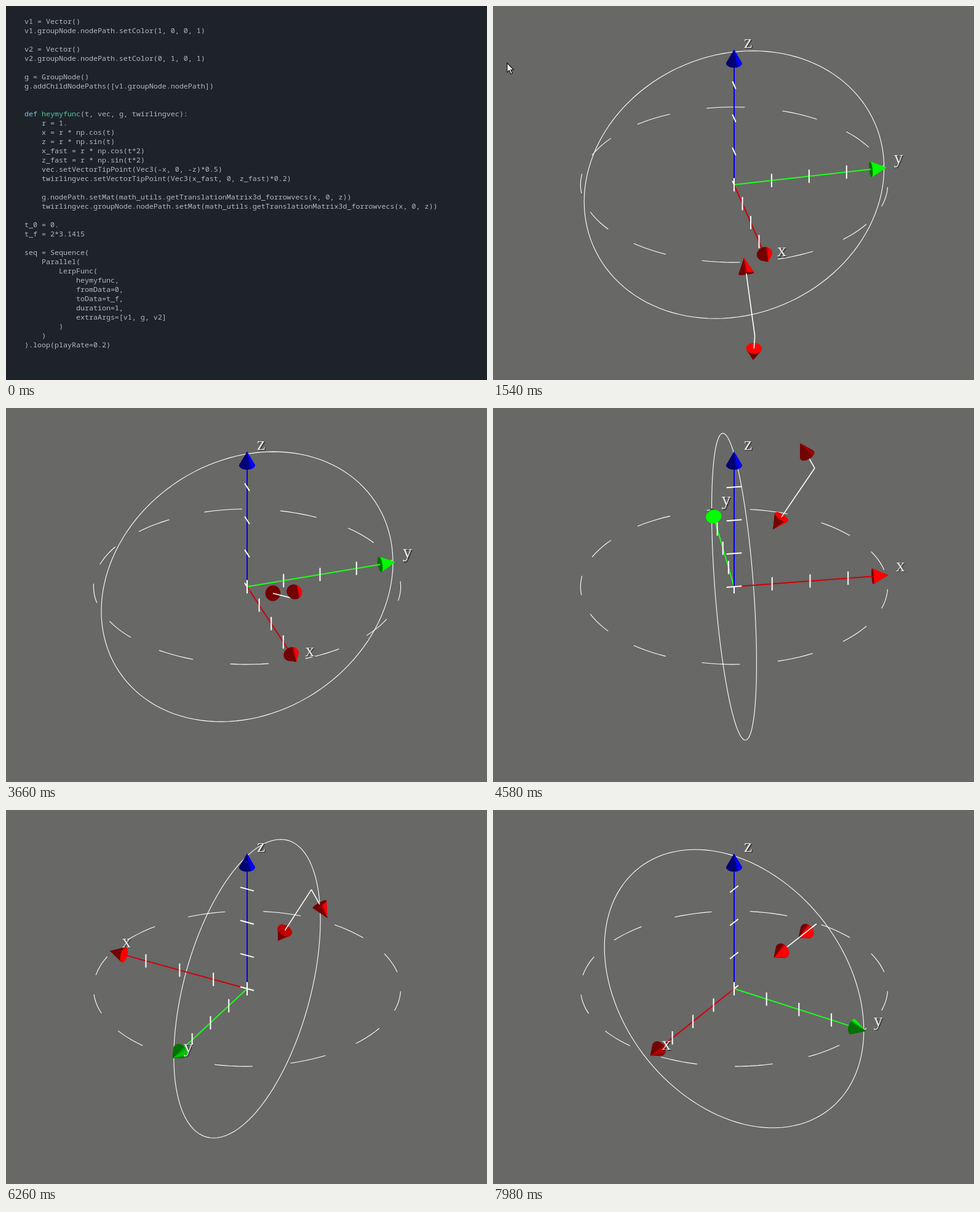
An HTML page with a canvas for the animation above (8 s loop, 782 by 607 pixels).

```html
<!DOCTYPE html>
<html>
<head>
<meta charset="utf-8">
<style>
html, body { margin: 0; width: 782px; height: 607px; overflow: hidden; background: #686866; }
canvas, pre { position: absolute; left: 0; top: 0; }
pre {
  box-sizing: border-box; width: 782px; height: 607px; margin: 0; padding: 17px 30px;
  background: #1d2329; color: #b1bac1;
  font: 11.6667px/15px "Noto Sans Mono", "DejaVu Sans Mono", monospace;
}
b { font-weight: normal; color: #7cc4e0; }
i { font-style: normal; color: #4fc9a0; }
</style>
</head>
<body>
<canvas id="stage" width="782" height="607"></canvas>
<pre id="code">v1 = Vector()
v1.groupNode.nodePath.setColor(1, 0, 0, 1)

v2 = Vector()
v2.groupNode.nodePath.setColor(0, 1, 0, 1)

g = GroupNode()
g.addChildNodePaths([v1.groupNode.nodePath])


<b>def</b> <i>heymyfunc</i>(t, vec, g, twirlingvec):
    r = 1.
    x = r * np.cos(t)
    z = r * np.sin(t)
    x_fast = r * np.cos(t*2)
    z_fast = r * np.sin(t*2)
    vec.setVectorTipPoint(Vec3(-x, 0, -z)*0.5)
    twirlingvec.setVectorTipPoint(Vec3(x_fast, 0, z_fast)*0.2)

    g.nodePath.setMat(math_utils.getTranslationMatrix3d_forrowvecs(x, 0, z))
    twirlingvec.groupNode.nodePath.setMat(math_utils.getTranslationMatrix3d_forrowvecs(x, 0, z))

t_0 = 0.
t_f = 2*3.1415

seq = Sequence(
    Parallel(
        LerpFunc(
            heymyfunc,
            fromData=0,
            toData=t_f,
            duration=1,
            extraArgs=[v1, g, v2]
        )
    )
).loop(playRate=0.2)</pre>
<script>
const ctx = document.getElementById('stage').getContext('2d');
const code = document.getElementById('code');
const R = 249.7, CX = 392, CY = 290, TAU = 2 * Math.PI, DEG = Math.PI / 180;
const TILT_SIN = .505, TILT_COS = .863;
const LAMP = [1.8, .2, .1]; // point light, in view space
const RED = [255, 0, 0], GREEN = [0, 255, 0], BLUE = [0, 0, 255];

// Camera turn around the z axis: [ms, degrees]
const TURN = [[3000, 12.5], [3400, 13.2], [3660, 18.3], [3820, 30], [4200, 66], [4500, 96],
  [4580, 98.4], [4720, 99.5], [5540, 149.7], [6260, 241.5], [6340, 248], [6980, 286],
  [7140, 288], [7900, 327.6]];

function track(keys, t) {
  if (t <= keys[0][0]) return keys[0][1];
  for (let k = 1; k < keys.length; k++) {
    const [t0, v0] = keys[k - 1], [t1, v1] = keys[k];
    if (t < t1) return v0 + (v1 - v0) * (t - t0) / (t1 - t0);
  }
  return keys[keys.length - 1][1];
}

const add = (a, b, k = 1) => a.map((v, j) => v + b[j] * k);
const dot = (a, b) => a[0] * b[0] + a[1] * b[1] + a[2] * b[2];
const cross = (a, b) => [a[1] * b[2] - a[2] * b[1], a[2] * b[0] - a[0] * b[2], a[0] * b[1] - a[1] * b[0]];
const unit = a => a.map(v => v / Math.hypot(...a));
const screen = p => [CX + R * p[0], CY - R * p[1]];

let phi;
// World to view space: right, up, towards the viewer
function view(x, y, z) {
  const s = Math.sin(phi), c = Math.cos(phi), near = x * c - y * s;
  return [x * s + y * c, TILT_COS * z - TILT_SIN * near, TILT_SIN * z + TILT_COS * near];
}

function path(points) {
  ctx.beginPath();
  points.forEach(p => ctx.lineTo(...screen(p)));
}

function line(points, color, width) {
  path(points);
  ctx.strokeStyle = color;
  ctx.lineWidth = width;
  ctx.stroke();
}

function face(points, normal, rgb) {
  const toLamp = unit(add(LAMP, points[0], -1));
  const k = Math.min(1, .45 + 1.4 * Math.max(0, dot(normal, toLamp)));
  path(points);
  ctx.closePath();
  ctx.fillStyle = ctx.strokeStyle = `rgb(${rgb.map(v => Math.round(v * k))})`;
  ctx.lineWidth = .6;
  ctx.fill();
  ctx.stroke();
}

function cone(base, tip, dir, rgb) {
  const a = unit(cross(dir, Math.abs(dir[2]) < .9 ? [0, 0, 1] : [0, 1, 0])), b = cross(dir, a);
  const n = 32, rim = [];
  const radial = k => add(a.map(v => v * Math.cos(k * TAU / n)), b, Math.sin(k * TAU / n));
  for (let k = 0; k <= n; k++) rim.push(add(base, radial(k), .05));
  for (let k = 0; k < n; k++) {
    const normal = add(radial(k + .5).map(v => v * .894), dir, .447);
    if (normal[2] > 0) face([rim[k], rim[k + 1], tip], normal, rgb);
  }
  if (dir[2] < 0) face(rim, dir.map(v => -v), rgb);
}

function arrow({ from, to, rgb, color, tick }) {
  const dir = unit(add(to, from, -1));
  const base = add(to, dir, -.088), tip = add(to, dir, .012);
  const shaft = () => {
    line([from, base], color, tick ? 2 : 1.6);
    for (let k = 0; tick && k < 4; k++) {
      const p = add(from, to, k / 4);
      line([add(p, tick, -.05), add(p, tick, .05)], '#fff', 2);
    }
  };
  if (dir[2] >= 0) shaft();
  cone(base, tip, dir, rgb);
  if (dir[2] < 0) shaft();
}

function label(text, p) {
  const [x, y] = screen(p);
  ctx.font = '30px "Liberation Serif", "Noto Serif", serif';
  ctx.fillStyle = '#303030';
  ctx.fillText(text, x + 17.5, y - 5.5);
  ctx.fillStyle = '#e6e6e6';
  ctx.fillText(text, x + 16, y - 7);
}

// Arc in the plane of u and v
function arc(u, v, a0, a1) {
  const n = Math.ceil((a1 - a0) * 20), points = [];
  for (let k = 0; k <= n; k++) {
    const a = a0 + (a1 - a0) * k / n;
    points.push(add(u.map(c => c * Math.cos(a)), v, Math.sin(a)));
  }
  line(points, '#fff', 1.1);
}

function cursor(x, y) {
  ctx.save();
  ctx.translate(x, y);
  ctx.beginPath();
  [[0, 0], [0, 15], [3.5, 12], [6, 18], [8.5, 17], [6, 11], [10.5, 11]].forEach(p => ctx.lineTo(...p));
  ctx.closePath();
  ctx.fillStyle = '#fff';
  ctx.strokeStyle = '#111';
  ctx.lineWidth = 1.2;
  ctx.fill();
  ctx.stroke();
  ctx.restore();
}

function scene(t) {
  phi = track(TURN, t) * DEG;
  ctx.fillStyle = '#686866';
  ctx.fillRect(0, 0, 782, 607);

  const O = [0, 0, 0], X = view(1, 0, 0), Y = view(0, 1, 0), Z = view(0, 0, 1);
  arc(Y, Z, 0, TAU);
  for (let a = .25; a < TAU; a += .5) arc(Y, X, a, Math.min(a + .25, TAU));

  const w = 36 * DEG * (t - 2970) / 1000;
  const orbit = (a, r) => view(r * Math.cos(a), 0, r * Math.sin(a));
  const P = orbit(w, 1);
  [
    { from: O, to: X, rgb: RED, color: '#d0000c', tick: Z },
    { from: O, to: Y, rgb: GREEN, color: '#1cff1c', tick: Z },
    { from: O, to: Z, rgb: BLUE, color: '#0000f4', tick: X },
    { from: P, to: orbit(w, .5), rgb: RED, color: '#fff' },
    { from: P, to: add(P, orbit(2 * w, .2)), rgb: RED, color: '#fff' }
  ].sort((a, b) => a.to[2] - b.to[2]).forEach(arrow);

  label('x', X);
  label('y', Y);
  label('z', Z);
  if (t < 1900) cursor(23, track([[1340, 82], [1540, 92.5]], t));
}

function draw(now) {
  const ms = now % 8000;
  code.style.display = ms < 500 ? 'block' : 'none';
  if (ms >= 500) {
    const t = 500 + Math.floor((ms - 500) / 40) * 40;
    scene(t > 6980 && t < 7140 ? 6980 : t);
  }
  requestAnimationFrame(draw);
}
requestAnimationFrame(draw);
</script>
</body>
</html>
```
